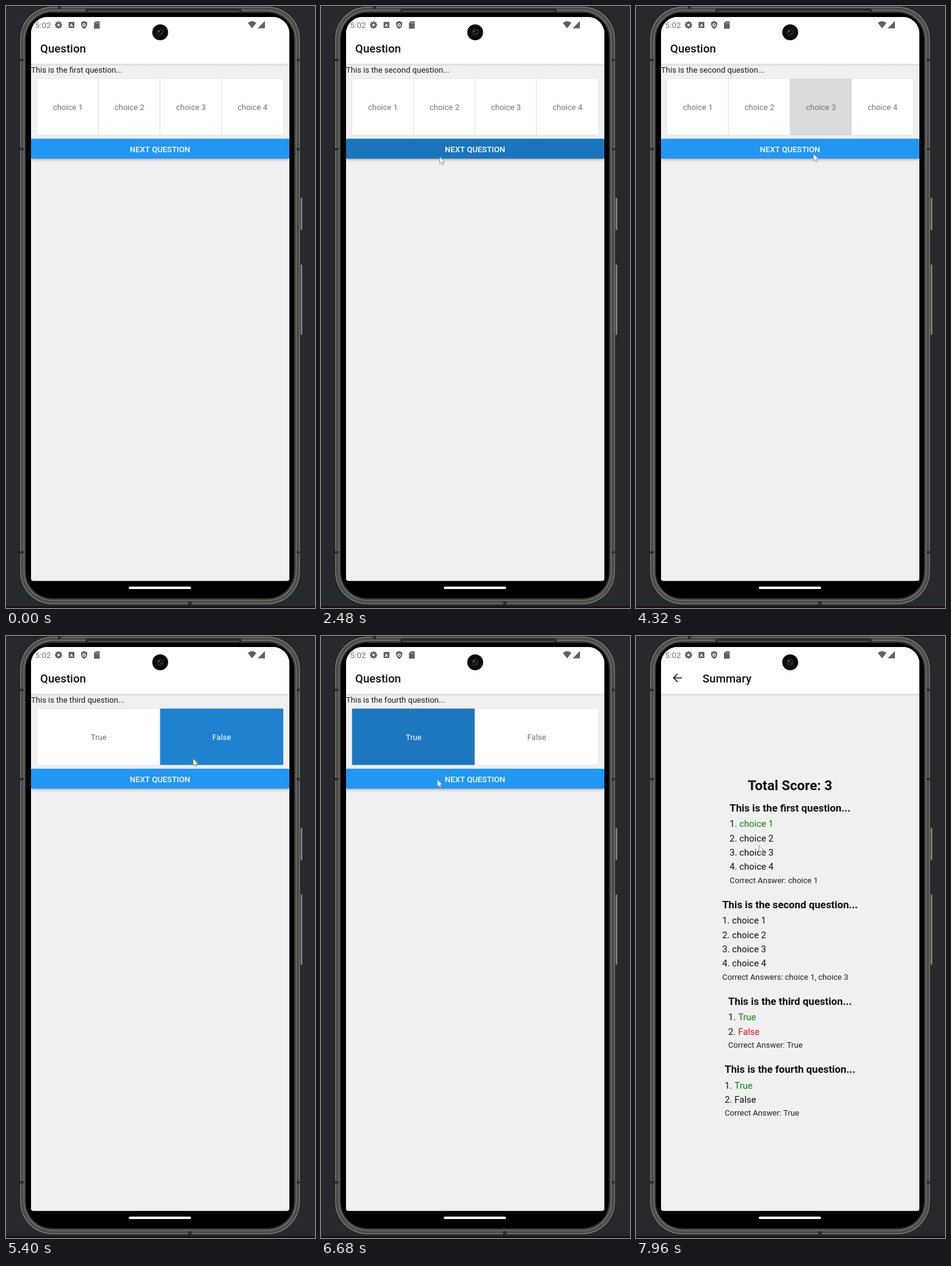
Animation, 506 px wide and 984 px high, one loop 8 s. Source, as an HTML page with a canvas:

```html
<!DOCTYPE html>
<html lang="en">
<head>
<meta charset="utf-8">
<title>Quiz app</title>
<style>
html, body { margin: 0; width: 100%; height: 100%; overflow: hidden; background: #28292d; }
canvas { display: block; width: 506px; height: 984px; }
</style>
</head>
<body>
<canvas id="stage"></canvas>
<script>
const W = 506, H = 984, LOOP = 8000;
const canvas = document.getElementById('stage');
const ctx = canvas.getContext('2d');
const dpr = window.devicePixelRatio || 1;
canvas.width = W * dpr;
canvas.height = H * dpr;

const DP = 0.9335;
const FAMILY = 'Roboto, sans-serif';
const CHOICES = ['choice 1', 'choice 2', 'choice 3', 'choice 4'];
const BOOL = ['True', 'False'];
const GREEN = '#168016', RED = '#f01010';

const questions = [
  { from: 0, word: 'first', options: CHOICES, answer: 'Correct Answer: choice 1', colors: [GREEN], pick: 0, pickAt: 1400 },
  { from: 2310, word: 'second', options: CHOICES, answer: 'Correct Answers: choice 1, choice 3', colors: [] },
  { from: 4470, word: 'third', options: BOOL, answer: 'Correct Answer: True', colors: [GREEN, RED], pick: 1, pickAt: 5010 },
  { from: 5990, word: 'fourth', options: BOOL, answer: 'Correct Answer: True', colors: [GREEN], pick: 0, pickAt: 6430 }
];
const SUMMARY_AT = 7064, SUMMARY_MS = 400;

// Presses: time and position; target is an option index or 'next'
const presses = [
  { t: 1340, x: 75, y: 184, target: 0 },
  { t: 2250, x: 194, y: 246, target: 'next' },
  { t: 3360, x: 118, y: 192, target: 0 },
  { t: 4080, x: 288, y: 196, target: 2 },
  { t: 4410, x: 290, y: 241, target: 'next' },
  { t: 4950, x: 306, y: 200, target: 1 },
  { t: 5930, x: 296, y: 242, target: 'next' },
  { t: 6370, x: 172, y: 199, target: 0 },
  { t: 6900, x: 195, y: 244, target: 'next' }
];

// Pointer path: time, x, y
const path = [
  [520, 484, 284], [1080, 75, 184], [1500, 75, 184], [2120, 194, 246],
  [3000, 194, 246], [3280, 118, 192], [3500, 118, 192], [3980, 288, 196],
  [4110, 288, 196], [4290, 290, 241], [4620, 290, 241], [4890, 306, 200],
  [5540, 306, 200], [5800, 296, 242], [5980, 296, 242], [6190, 172, 199],
  [6500, 172, 199], [6760, 195, 244], [7020, 195, 244], [7200, 198, 276],
  [7600, 201, 342]
];

const clamp = v => Math.max(0, Math.min(1, v));
const ease = p => p * p * (3 - 2 * p);

function rect(x, y, w, h, color) {
  ctx.fillStyle = color;
  ctx.fillRect(x, y, w, h);
}

function round(x, y, w, h, r, color) {
  ctx.fillStyle = color;
  ctx.beginPath();
  ctx.roundRect(x, y, w, h, r);
  ctx.fill();
}

function circle(x, y, r, color) {
  ctx.fillStyle = color;
  ctx.beginPath();
  ctx.arc(x, y, r, 0, Math.PI * 2);
  ctx.fill();
}

function shape(points, color) {
  ctx.fillStyle = color;
  ctx.beginPath();
  points.forEach(([x, y]) => ctx.lineTo(x, y));
  ctx.closePath();
  ctx.fill();
}

function text(str, x, y, size, color, weight = 400, align = 'left') {
  ctx.font = `${weight} ${size * DP}px ${FAMILY}`;
  ctx.textAlign = align;
  ctx.fillStyle = color;
  ctx.fillText(str, x, y);
  return ctx.measureText(str).width;
}

function drawDevice() {
  rect(0, 0, W, H, '#28292d');
  rect(0, 0, W, 1, '#191a1d');
  rect(0, 981, W, 3, '#171116');
  for (const [y, h] of [[312, 56], [421, 118]]) {
    round(480, y, 6, h, 2, '#37383a');
    rect(482, y + 2, 3, h - 4, '#858585');
  }
  round(22, 0, 460.5, 979, 54, '#1b1b1c');
  round(23, 1, 458.5, 977, 53, '#777775');
  round(24.5, 2.5, 455.5, 974, 52, '#4b4b4a');
  round(28.5, 6.5, 447.5, 966, 48, '#696968');
  round(30.5, 8.5, 443.5, 962, 46, '#343434');
  round(32.5, 11, 439, 957, 43, '#000');
  round(130, 4, 256, 7, 3, '#292929');
  rect(134, 8, 248, 1.5, '#555');
  for (const y of [88, 234, 893]) {
    rect(23, y - 2, 6, 4, '#2d2d2d');
    rect(476, y - 2, 5, 4, '#2d2d2d');
  }
  rect(85, 1, 5, 4, '#2d2d2d');
  rect(298, 973, 6, 5, '#2d2d2d');
  round(201, 949, 102, 4, 2, '#fff');
}

function drawStatus() {
  const ink = '#616161';
  text('5:02', 47.5, 35.5, 14.6, '#757575');
  for (let i = 0; i < 8; i++) {
    ctx.save();
    ctx.translate(86, 31);
    ctx.rotate(i * Math.PI / 4);
    rect(-1.4, -6, 2.8, 3.5, ink);
    ctx.restore();
  }
  circle(86, 31, 4.6, ink);
  circle(86, 31, 2, '#fff');

  round(102.5, 26, 9.5, 10, 1, ink);
  text('A', 107.2, 34, 8.5, '#fff', 700, 'center');

  shape([[128, 24.5], [133, 26.7], [133, 31], [131.3, 35], [128, 37.5], [124.7, 35], [123, 31], [123, 26.7]], ink);
  circle(128, 31, 2.7, '#fff');
  shape([[127, 29], [130, 31], [127, 33]], ink);

  shape([[147, 25], [153.5, 25], [153.5, 37], [144, 37], [144, 28]], ink);
  for (let i = 0; i < 3; i++) rect(147 + i * 2, 26.5, 1, 2.5, '#aaa');

  ctx.fillStyle = ink;
  ctx.beginPath();
  ctx.moveTo(403, 36.5);
  ctx.lineTo(396, 27.7);
  ctx.quadraticCurveTo(403, 22, 410, 27.7);
  ctx.fill();
  shape([[424, 24.5], [424, 36.5], [412, 36.5]], ink);
}

function drawCamera() {
  circle(252.5, 43, 13, '#090909');
  circle(252.5, 43, 6, '#252728');
  circle(252.5, 43, 3.7, '#101112');
  circle(250.5, 41.5, 1.2, '#777');
  circle(254.3, 44.8, 1, '#4d4d4d');
}

function drawHeaderBar() {
  rect(41, 94, 423, 846, '#f0f0f0');
  const g = ctx.createLinearGradient(0, 94, 0, 99);
  g.addColorStop(0, '#d7d7d7');
  g.addColorStop(1, '#f0f0f0');
  rect(41, 94, 423, 5, g);
  rect(41, 18, 423, 76.5, '#fff');
}

function drawRipples(target, now, start, x, y, w, h, alpha) {
  for (const p of presses) {
    const age = now - p.t;
    if (p.target !== target || age < 0 || age > 550) continue;
    if (target !== 'next' && p.t < start) continue;
    ctx.save();
    ctx.beginPath();
    ctx.roundRect(x, y, w, h, target === 'next' ? 2 : 0);
    ctx.clip();
    const fade = 1 - clamp((age - 300) / 250);
    const grow = 1 - (1 - clamp(age / 200)) ** 2;
    circle(p.x, p.y, 8 + grow * w * 1.1, `rgba(0,0,0,${alpha * fade})`);
    ctx.restore();
  }
}

function drawOptions(q, now) {
  const cell = 403 / q.options.length;
  round(50.5, 118, 404, 93.5, 2, '#dedede');
  q.options.forEach((label, i) => {
    const x = 51 + i * cell, w = cell - (i < q.options.length - 1 ? 1 : 0);
    const on = q.pick === i && now >= q.pickAt;
    rect(x, 118.7, w, 92, on ? '#2089dc' : '#fff');
    drawRipples(i, now, q.from, x, 118.7, w, 92, 0.14);
    text(label, x + cell / 2, 170, 14, on ? '#fff' : '#737373', 400, 'center');
  });
}

function drawQuestion(now) {
  const q = questions.filter(item => now >= item.from).pop();
  drawHeaderBar();
  text('Question', 56, 75.5, 20, '#111', 500);
  text(`This is the ${q.word} question...`, 41, 109, 14, '#1b1b1b');
  drawOptions(q, now);

  ctx.save();
  ctx.shadowColor = 'rgba(0,0,0,.3)';
  ctx.shadowBlur = 4 * dpr;
  ctx.shadowOffsetY = 1.5 * dpr;
  round(41, 217, 423, 32.5, 2, '#2196f3');
  ctx.restore();
  drawRipples('next', now, 0, 41, 217, 423, 32.5, 0.22);
  text('NEXT QUESTION', 252.2, 238.7, 14, '#fff', 500, 'center');
}

function drawSummary() {
  const ink = '#111';
  drawHeaderBar();
  ctx.strokeStyle = ink;
  ctx.lineWidth = 1.7;
  ctx.beginPath();
  ctx.moveTo(75, 68.5);
  ctx.lineTo(61.5, 68.5);
  ctx.moveTo(68, 62);
  ctx.lineTo(61.5, 68.5);
  ctx.lineTo(68, 75);
  ctx.stroke();
  text('Summary', 109, 75.5, 20, ink, 500);
  text('Total Score: 3', 252.2, 252, 24, ink, 700, 'center');

  let y = 286.6;
  for (const q of questions) {
    const title = `This is the ${q.word} question...`;
    const x = 252.2 - text(title, 252.2, y, 18, ink, 700, 'center') / 2;
    y += 25.6;
    q.options.forEach((label, i) => {
      const w = text(`${i + 1}. `, x, y, 16, ink);
      text(label, x + w, y, 16, q.colors[i] || ink);
      y += 23.35;
    });
    text(q.answer, x, y - 1.9, 14, '#222');
    y += 39;
  }
}

function drawScreen(now) {
  ctx.save();
  ctx.beginPath();
  ctx.roundRect(41, 18, 423, 921.5, [27, 27, 4, 4]);
  ctx.clip();
  rect(41, 18, 423, 922, '#fff');
  const p = clamp((now - SUMMARY_AT) / SUMMARY_MS);
  if (p < 0.25) {
    ctx.globalAlpha = 1 - p * 4;
    drawQuestion(now);
  }
  if (p > 0) {
    ctx.globalAlpha = clamp(p * 1.85);
    ctx.translate(42 * (1 - p) ** 3, 0);
    drawSummary();
  }
  ctx.restore();

  ctx.save();
  ctx.beginPath();
  ctx.roundRect(41, 18, 423, 60, [27, 27, 0, 0]);
  ctx.clip();
  drawStatus();
  ctx.restore();
  drawCamera();
}

function pointerAt(now) {
  if (now < path[0][0]) return null;
  const i = path.findIndex(k => k[0] > now);
  if (i < 0) return path[path.length - 1].slice(1);
  const [t0, x0, y0] = path[i - 1], [t1, x1, y1] = path[i];
  const p = ease((now - t0) / (t1 - t0));
  return [x0 + (x1 - x0) * p, y0 + (y1 - y0) * p];
}

function drawPointer(now) {
  const pos = pointerAt(now);
  if (!pos) return;
  ctx.save();
  ctx.translate(...pos);
  shape([[0.5, 0.5], [0.5, 12], [3.1, 9.7], [4.9, 13.8], [6.8, 13], [5, 9], [8.6, 8.8]], '#fff');
  ctx.strokeStyle = '#858585';
  ctx.lineWidth = 0.9;
  ctx.lineJoin = 'round';
  ctx.stroke();
  ctx.restore();
}

function draw() {
  const now = performance.now() % LOOP;
  ctx.setTransform(dpr, 0, 0, dpr, 0, 0);
  drawDevice();
  drawScreen(now);
  drawPointer(now);
  requestAnimationFrame(draw);
}
draw();
</script>
</body>
</html>
```
